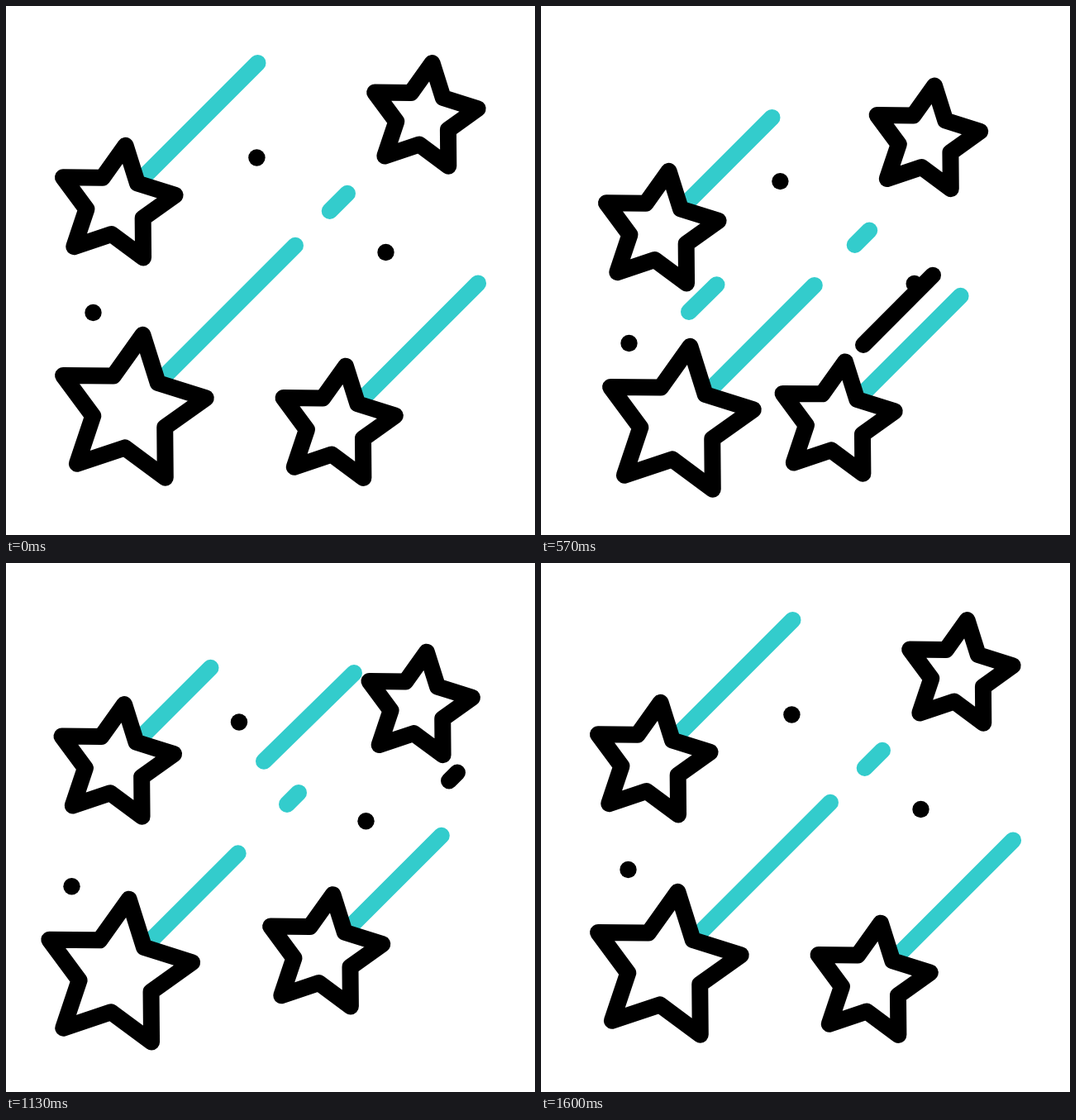
An HTML page with a canvas that plays this animation: 640 by 640 pixels, repeating every 1.67 s.

```html
<!DOCTYPE html>
<html lang="en">
<head>
<meta charset="utf-8">
<title>Shooting stars</title>
<style>
html, body { margin: 0; width: 100%; height: 100%; overflow: hidden; background: #fff; }
canvas { display: block; width: 100vmin; height: 100vmin; }
</style>
</head>
<body>
<canvas id="stage" width="640" height="640"></canvas>
<script>
const ctx = document.getElementById('stage').getContext('2d');
const LOOP = 1670, STEP = 100 / 3, LAST = 48;
const BLACK = '#000', CYAN = '#33cccc';
const BEATS = [1, 11, 17, 25, 34, 43, LAST];

// Smooth curve through keys; flat wherever a neighbouring span is flat.
function curve(times, values) {
  const slope = i => (values[i + 1] - values[i]) / (times[i + 1] - times[i]);
  const tangent = i => {
    if (i === 0 || i === times.length - 1) return 0;
    const a = slope(i - 1), b = slope(i);
    if (a === 0 || b === 0) return 0;
    const before = times[i] - times[i - 1], after = times[i + 1] - times[i];
    return (a * after + b * before) / (before + after);
  };
  return n => {
    if (n <= times[0]) return values[0];
    if (n >= times[times.length - 1]) return values[values.length - 1];
    let i = 0;
    while (n > times[i + 1]) i++;
    const h = times[i + 1] - times[i], u = (n - times[i]) / h, w = 1 - u;
    return values[i] * w * w * (1 + 2 * u) + values[i + 1] * u * u * (3 - 2 * u)
      + h * u * w * (tangent(i) * w - tangent(i + 1) * u);
  };
}

// Offset that leaves zero and comes back to it.
const drift = (values, times = BEATS) => curve(times, [0, ...values, 0]);

const EARLY_REST = [1, 11, 17, 25, 34, 38, LAST];
const WIDE_SWING = [1, 11, 17, 25, 29, 34, 43, LAST];

// Each tail segment: distance of its two ends along the up-right diagonal.
const stars = [
  {
    x: 133.3, y: 240.1, r: 72.2,
    dx: drift([18.5, 10, -18, -1.5, 0], EARLY_REST),
    dy: drift([19.2, 31, 33.2, 2.3, 0], EARLY_REST),
    tails: [{ from: 26, to: 171.2, toShift: drift([-26, -35, -31.3, -55.5, -19.3]) }]
  },
  {
    x: 151, y: 488.7, r: 92,
    dx: drift([14.5, 15, -13.2, -24, -16.7, 0], WIDE_SWING),
    dy: drift([4.6, 14, 25.7, 20, 8.9, 0], WIDE_SWING),
    tails: [
      { from: 33, to: 199, toShift: drift([-32.4, -34.2, -21.5, -52.6, -11.6]) },
      {
        from: 240.7, fromShift: drift([-25, -27, -11, -35, -4]),
        to: 262, toShift: drift([-28.3, -30.8, -13.7, -42.3, -6])
      }
    ]
  },
  {
    x: 505.2, y: 134.6, r: 66.3,
    dx: drift([-30, -39.5, -29.2, -6.7, -0.4]),
    dy: drift([12.7, 27.5, 45, 38.6, 8.2]),
    tails: []
  },
  {
    x: 399.7, y: 506.8, r: 72,
    dx: drift([-30, -43, -35.5, -15.5, -5]),
    dy: drift([9, -5.2, -28, -34.5, -12]),
    tails: [{ from: 26, to: 171.4, toShift: drift([-36.2, -20.5, -26.5, -28.8, -4]) }]
  }
];

const dots = [
  { x: 303.4, y: 183.5, dx: drift([-4.2, -14, -31.2, -21.4, 0]), dy: drift([22.8, 28.6, 23, 9, 0]) },
  { x: 105.5, y: 371, dx: drift([11.5, 1, -35, -26, 0]), dy: drift([24, 37, 40.7, 20.3, 0]) },
  { x: 459.5, y: 298, dx: drift([-3, -7.8, -28, -24, -2]), dy: drift([24.2, 38, 31.2, 14.2, 1.2]) }
];

// Streaks run along a fixed line, the head leading and the tail catching up.
function streak(color, times, tail, head, yAt) {
  return { color, yAt, tail: curve(times, tail), head: curve(times, head) };
}

const streaks = [
  streak(BLACK, [9, 11, 17, 25, 34, 36],
    [373, 375, 390, 443, 536, 547], [373, 401, 474, 523.5, 546, 547],
    x => 425 - (x - 375) * 1.003),
  streak(CYAN, [14.8, 17, 25, 34, 43, 45],
    [176, 179, 203, 312, 438, 447], [176, 212.5, 357, 421, 446, 447],
    x => 370 - (x - 179) * 0.979)
];

function line(color, x1, y1, x2, y2) {
  ctx.strokeStyle = color;
  ctx.beginPath();
  ctx.moveTo(x1, y1);
  ctx.lineTo(x2, y2);
  ctx.stroke();
}

function drawTails(star, n) {
  const x = star.x + star.dx(n), y = star.y + star.dy(n);
  for (const { from, to, fromShift, toShift } of star.tails) {
    const a = from + (fromShift ? fromShift(n) : 0), b = to + toShift(n);
    line(CYAN, x + a, y - a, x + b, y - b);
  }
}

function drawStar(star, n) {
  const x = star.x + star.dx(n), y = star.y + star.dy(n);
  ctx.strokeStyle = BLACK;
  ctx.beginPath();
  for (let i = 0; i < 10; i++) {
    const angle = (i * 36 - 81) * Math.PI / 180;
    const r = i % 2 ? star.r * 0.503 : star.r;
    ctx.lineTo(x + r * Math.cos(angle), y + r * Math.sin(angle));
  }
  ctx.closePath();
  ctx.stroke();
}

function drawDot(dot, n) {
  ctx.fillStyle = BLACK;
  ctx.beginPath();
  ctx.arc(dot.x + dot.dx(n), dot.y + dot.dy(n), 10.2, 0, Math.PI * 2);
  ctx.fill();
}

function drawStreak({ color, tail, head, yAt }, n) {
  const a = tail(n), b = head(n);
  if (b - a > 0.3) line(color, a, yAt(a), b, yAt(b));
}

function render(now) {
  const n = Math.min(LAST, Math.floor((now % LOOP + 5) / STEP));
  ctx.fillStyle = '#fff';
  ctx.fillRect(0, 0, 640, 640);
  ctx.lineWidth = 20;
  ctx.lineCap = ctx.lineJoin = 'round';
  stars.forEach(star => drawTails(star, n));
  streaks.forEach(s => drawStreak(s, n));
  dots.forEach(dot => drawDot(dot, n));
  stars.forEach(star => drawStar(star, n));
}

let start;
function tick(now) {
  start ??= now;
  render(now - start);
  requestAnimationFrame(tick);
}
render(0);
requestAnimationFrame(tick);
</script>
</body>
</html>
```
